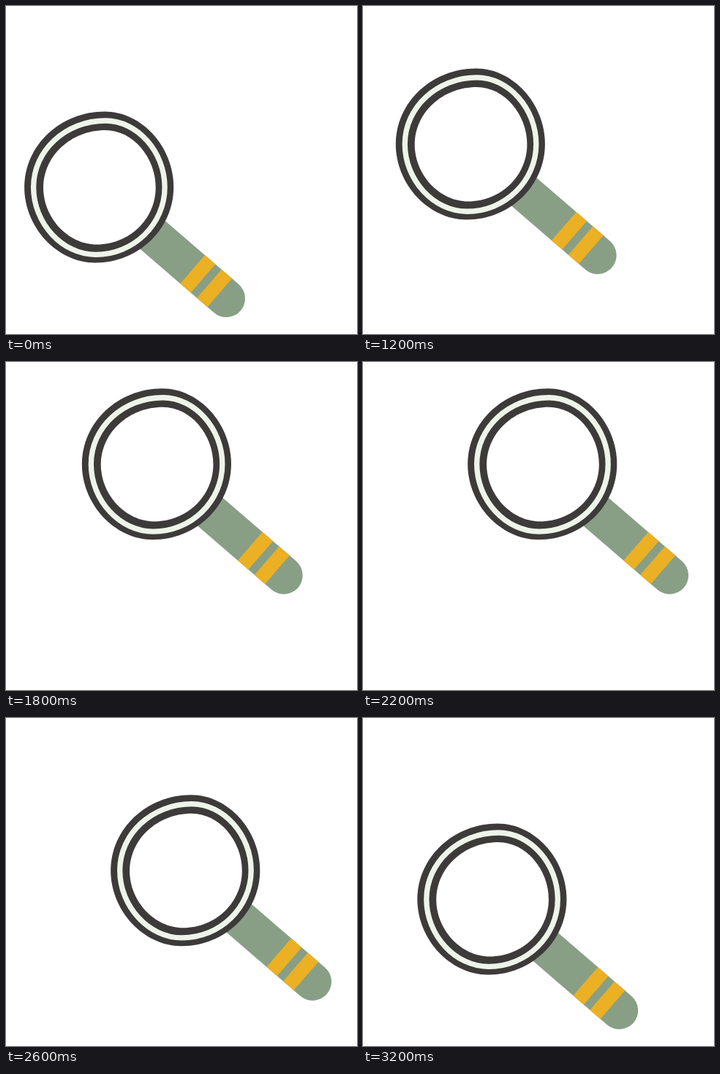
Recreate the animation shown at these times as an HTML page with a canvas. Size 480 px wide and 449 px high, loop 3.4 s.

```html
<!DOCTYPE html>
<html lang="en">
<head>
<meta charset="utf-8">
<title>Magnifying glass</title>
<style>
html, body { margin: 0; width: 100%; height: 100%; overflow: hidden; background: #fff; }
canvas { display: block; }
</style>
</head>
<body>
<canvas id="stage" width="480" height="449"></canvas>
<script>
const ctx = document.getElementById('stage').getContext('2d');
const DARK = '#3d3b3a', LIGHT = '#eff4ea', GREEN = '#889f86', YELLOW = '#ebb023';
const LOOP = 3400, HOLD = 1000, STEP = 200, UNIT = 9.84;
const { min, max, round, floor, PI } = Math;

// Grid position after n steps: up, across to the right, down, back left
function place(n) {
  const right = max(n, 2.5 * n - 5);
  const back = 46.5 - 3.5 * n;
  const down = max(11 - (n - 7) * 10 / 3, (12.5 - n) / 2);
  return [round(min(right, 12, back)), -round(min(3 * n, 11, down))];
}

// Lopsided oval, a little flatter at the upper right and lower left
function oval(left, top, right, bottom, topX, bottomX, midY) {
  const FLAT = 0.535, ROUND = 0.552;
  const quarter = (x, endY, sideX, k, outward) => {
    const a = [x + (sideX - x) * k, endY];
    const b = [sideX, midY + (endY - midY) * k];
    if (outward) ctx.bezierCurveTo(...a, ...b, sideX, midY);
    else ctx.bezierCurveTo(...b, ...a, x, endY);
  };
  ctx.beginPath();
  ctx.moveTo(topX, top);
  quarter(topX, top, right, FLAT, true);
  quarter(bottomX, bottom, right, ROUND, false);
  quarter(bottomX, bottom, left, FLAT, true);
  quarter(topX, top, left, ROUND, false);
  ctx.closePath();
}

function handle() {
  const r = 25.8, length = 165;
  ctx.save();
  ctx.translate(301.2, 400.3);
  ctx.rotate(40.8 * PI / 180);
  ctx.fillStyle = GREEN;
  ctx.beginPath();
  ctx.moveTo(-length, -r);
  ctx.arc(0, 0, r, -PI / 2, PI / 2);
  ctx.lineTo(-length, r);
  ctx.fill();
  ctx.fillStyle = YELLOW;
  for (const x of [-60.9, -30.8]) ctx.fillRect(x, -r, 19, 2 * r);
  ctx.restore();
}

function lens() {
  oval(25.1, 144.5, 229.2, 351.5, 135, 122, 248);
  ctx.fillStyle = DARK;
  ctx.fill();
  oval(37.6, 157, 217.1, 340.3, 136, 122.5, 248);
  ctx.strokeStyle = LIGHT;
  ctx.lineWidth = 7.3;
  ctx.stroke();
  oval(51, 170, 204.7, 326.5, 136, 124, 248.5);
  ctx.fillStyle = '#fff';
  ctx.fill();
}

function draw(now) {
  const t = now % LOOP;
  const [x, y] = place(max(0, 1 + floor((t - HOLD) / STEP)));
  ctx.fillStyle = '#fff';
  ctx.fillRect(0, 0, 480, 449);
  ctx.save();
  ctx.translate(x * UNIT, y * UNIT);
  handle();
  lens();
  ctx.restore();
}

const start = performance.now();
function tick() {
  draw(performance.now() - start);
  requestAnimationFrame(tick);
}
tick();
</script>
</body>
</html>
```
